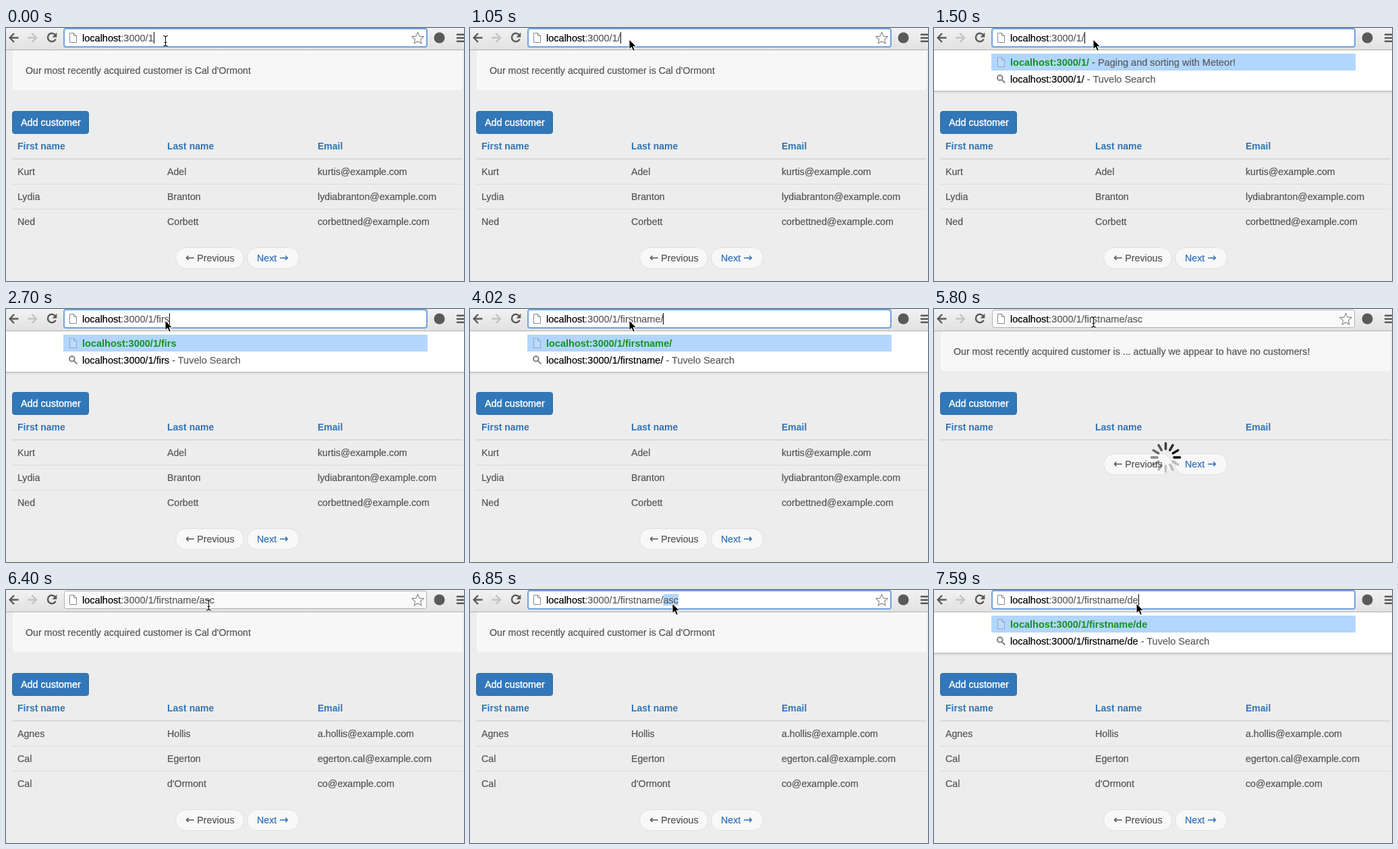
An HTML page that plays this animation: 679x375 px, repeating every 8 s.

```html
<!DOCTYPE html>
<html lang="en">
<head>
<meta charset="utf-8">
<title>Paging and sorting</title>
<style>
html, body { margin: 0; width: 100%; height: 100%; overflow: hidden; background: #ededed; }
svg { display: block; font: 14.2px "Liberation Sans", Arial, sans-serif; fill: #555; }
text { stroke: #555; stroke-width: .2; }
.bar { font-size: 14.53px; fill: #5e5e5e; }
.host { fill: #000; stroke: #000; }
.match { font-weight: bold; fill: #12951a; stroke: none; }
.head { font-weight: bold; font-size: 14px; fill: #3075b6; stroke: none; }
.link { fill: #2f6fb5; stroke: #2f6fb5; }
.button { font-size: 14.4px; fill: #fff; stroke: #fff; stroke-width: .4; }
.arrow { font: 16px "DejaVu Sans", sans-serif; }
.icon { fill: none; stroke: #5a5a5a; stroke-width: 2.5; }
.lens { fill: none; stroke: #808080; stroke-width: 2; }
</style>
</head>
<body>
<svg id="stage" width="679" height="375" viewBox="0 0 679 375"></svg>
<script>
const LOOP = 8000, HOST = 'localhost', PORT = ':3000';
const stage = document.getElementById('stage');

const byLast = [
  ['Kurt', 'Adel', 'kurtis@example.com'],
  ['Lydia', 'Branton', 'lydiabranton@example.com'],
  ['Ned', 'Corbett', 'corbettned@example.com']
];
const byFirst = [
  ['Agnes', 'Hollis', 'a.hollis@example.com'],
  ['Cal', 'Egerton', 'egerton.cal@example.com'],
  ['Cal', "d'Ormont", 'co@example.com']
];
const columns = [17, 239, 462];

// Each step changes part of the state and holds until the next one.
const steps = [
  [0, { path: '/1', rows: byLast, focus: 1, caret: 1, drop: 0, arrow: 0, x: 236, y: 17, pick: '' }],
  [450, { caret: 0 }],
  [1050, { path: '/1/', caret: 1, arrow: 1 }],
  [1500, { drop: 1 }],
  ...type('/1/', 'firstname/asc',
    [1950, 2100, 2250, 2700, 2990, 3440, 3590, 3730, 3880, 4020, 4320, 4610, 5050]),
  [3590, { arrow: 0 }],
  [3730, { arrow: 1 }],
  [4610, { arrow: 0 }],
  [4760, { arrow: 1 }],
  [5350, { drop: 0, focus: 0, caret: 0, arrow: 0 }],
  [5800, { rows: [] }],
  [5950, {}],
  [6100, { rows: byFirst }],
  [6250, { x: 258, y: 18 }],
  [6400, { x: 300, y: 20 }],
  [6550, { focus: 1, pick: 'all' }],
  [6700, { arrow: 1 }],
  [6850, { pick: 'order' }],
  [7440, { path: '/1/firstname/d', pick: '', caret: 1, drop: 1 }],
  [7590, { path: '/1/firstname/de' }]
].sort((a, b) => a[0] - b[0]);

function type(start, word, times) {
  return times.map((time, i) => [time, { path: start + word.slice(0, i + 1) }]);
}

function stateAt(time) {
  const state = {};
  for (const [at, change] of steps) {
    if (at <= time) Object.assign(state, change, { at });
  }
  return state;
}

const pen = document.createElement('canvas').getContext('2d');
function width(str) {
  pen.font = '14.53px "Liberation Sans", Arial, sans-serif';
  return pen.measureText(str).width;
}

const text = (x, y, str, cls = '') => `<text x="${x}" y="${y}" class="${cls}">${str}</text>`;
const rect = (x, y, w, h, fill, more = '') =>
  `<rect x="${x}" y="${y}" width="${w}" height="${h}" fill="${fill}" ${more}/>`;
const sheet = (y, color, fill) =>
  `<path d="M94.5 ${y}h6l4 4v10h-10zM100.5 ${y}v4h4" fill="${fill}" stroke="${color}"/>`;
const pill = (x, y, w) => rect(x + .5, y + .5, w - 1, 31, '#f8f8f8', 'rx="15.5" stroke="#e0e0e0"');

function page({ rows, at }) {
  const footer = rows.length ? 325 : 214;
  const news = rows.length ? "Cal d'Ormont" : '... actually we appear to have no customers!';
  return rect(10, 28, 667, 64, '#f7f7f7', 'rx="4"') +
    text(29, 68, 'Our most recently acquired customer is ' + news) +
    rect(9.5, 123.5, 113, 33, '#3277b8', 'rx="3.5" stroke="#2e6fae"') +
    text(22, 145, 'Add customer', 'button') +
    ['First name', 'Last name', 'Email'].map((name, i) => text(columns[i], 180, name, 'head')).join('') +
    rect(9, 193, 668, 2, '#dadada') +
    rows.map((row, i) =>
      row.map((cell, j) => text(columns[j], 218 + 37 * i, cell)).join('') +
      (i ? rect(9, 194 + 37 * i, 668, 1, '#dadada') : '')).join('') +
    pill(251, footer, 102) + pill(357, footer, 78) +
    text(266, footer + 21, '<tspan class="arrow">←</tspan> Previous') +
    text(372, footer + 21, 'Next <tspan class="arrow">→</tspan>', 'link') +
    (rows.length ? '' : spinner((at - 5800) / 1000));
}

function spinner(turns) {
  let out = '';
  for (let i = 0; i < 12; i++) {
    const age = (turns - i / 12 + 2) % 1;
    const opacity = Math.max(.22, 1 - age * 1.1);
    out += `<path d="M12.5 0h8.5" transform="rotate(${i * 30})" opacity="${opacity}"/>`;
  }
  return `<g transform="translate(343.5 220)" stroke="#000" stroke-width="3.6" stroke-linecap="round">${out}</g>`;
}

function toolbar({ path, focus, caret, drop, pick }) {
  const full = HOST + PORT + path;
  const end = 113 + width(full);
  const pickStart = pick === 'all' ? 113 : end - width('asc');
  return `<linearGradient id="metal" x2="0" y2="1">
      <stop stop-color="#f2f2f2"/><stop offset="1" stop-color="#e2e2e2"/></linearGradient>` +
    rect(0, 0, 679, 32, 'url(#metal)') + rect(0, 32, 679, 1, '#b0b0b0') +
    `<g class="icon"><path d="M18.5 14.5H6M12 8l-6.3 6.5L12 21"/>
      <path d="M32 14.5h12.5M38.5 8l6.3 6.5-6.3 6.5" stroke="#c4c4c4"/>
      <path d="M73 10.4A6.1 6.1 0 1 0 73.6 16.5"/></g>
    <path d="M75.3 6.8v6.9h-6.9z" fill="#5a5a5a"/>` +
    (focus
      ? rect(86, 1, 538, 27, '#fff', 'rx="3" stroke="#6fa3df" stroke-width="2"')
      : rect(86.5, 1.5, 537, 26, '#fafafa', 'rx="3" stroke="#b0b0b0"')) +
    sheet(7.5, '#888', '#fff') +
    (pick ? rect(pickStart, 6, end - pickStart, 17, '#b3d6fd') : '') +
    text(113, 20, `<tspan class="host">${HOST}</tspan>${PORT + path}`, 'bar') +
    (caret ? rect(Math.round(end), 6, 1, 17, '#000') : '') +
    (drop ? '' : star()) +
    `<circle cx="642.5" cy="14.5" r="8" fill="#5a5a5a"/>` +
    [8.5, 13.5, 18.5].map(y => rect(668, y, 11, 2.5, '#5a5a5a')).join('');
}

function star() {
  const points = Array.from({ length: 10 }, (_, i) => {
    const r = i % 2 ? 4.2 : 9.3, a = i * Math.PI / 5;
    return [610.5 + r * Math.sin(a), 15.5 - r * Math.cos(a)];
  });
  return `<polygon points="${points.join(' ')}" fill="#fff" stroke="#858585" stroke-width="1.1" stroke-linejoin="round"/>`;
}

function dropdown({ path }) {
  const full = HOST + PORT + path;
  const title = path === '/1/' ? ' - Paging and sorting with Meteor!' : '';
  const shadow = [.2, .11, .06, .03, .015].map((alpha, i) =>
    rect(0, 93 + i, 679, 1, '#000', `fill-opacity="${alpha}"`)).join('');
  return rect(0, 33, 679, 60, '#fff') + shadow +
    rect(85, 38, 540, 25, '#b2d6fe') + sheet(43.5, '#8fa6c2', '#bddbfb') +
    text(113, 56, `<tspan class="match">${full}</tspan>${title}`, 'bar') +
    `<g class="lens"><circle cx="97.8" cy="73.8" r="3.8"/><path d="M100.6 76.6l4.6 4.6"/></g>` +
    text(113, 81, `<tspan class="host">${full}</tspan> - Tuvelo Search`, 'bar');
}

function pointer({ arrow, x, y }) {
  const beam = 'M-3-5.5q3 0 3.5 2q.5-2 3.5-2M.5-4V8.5M-3 10q3 0 3.5-2q.5 2 3.5 2M-1.5 4.5h4';
  const shape = arrow
    ? '<path d="M0 0V14.5L3.4 11.4L5.8 17L8.4 15.9L6 10.4H10.6Z" fill="#000" stroke="#fff"/>'
    : `<path d="${beam}" fill="none" stroke="#fff" stroke-width="2.6" stroke-opacity=".7"/>
       <path d="${beam}" fill="none" stroke="#111" stroke-width="1.1"/>`;
  return `<g transform="translate(${x} ${y})">${shape}</g>`;
}

let shown = -1;
function draw() {
  const state = stateAt(performance.now() % LOOP);
  if (state.at !== shown) {
    shown = state.at;
    stage.innerHTML = page(state) + toolbar(state) + (state.drop ? dropdown(state) : '') + pointer(state);
  }
  requestAnimationFrame(draw);
}
draw();
</script>
</body>
</html>
```
